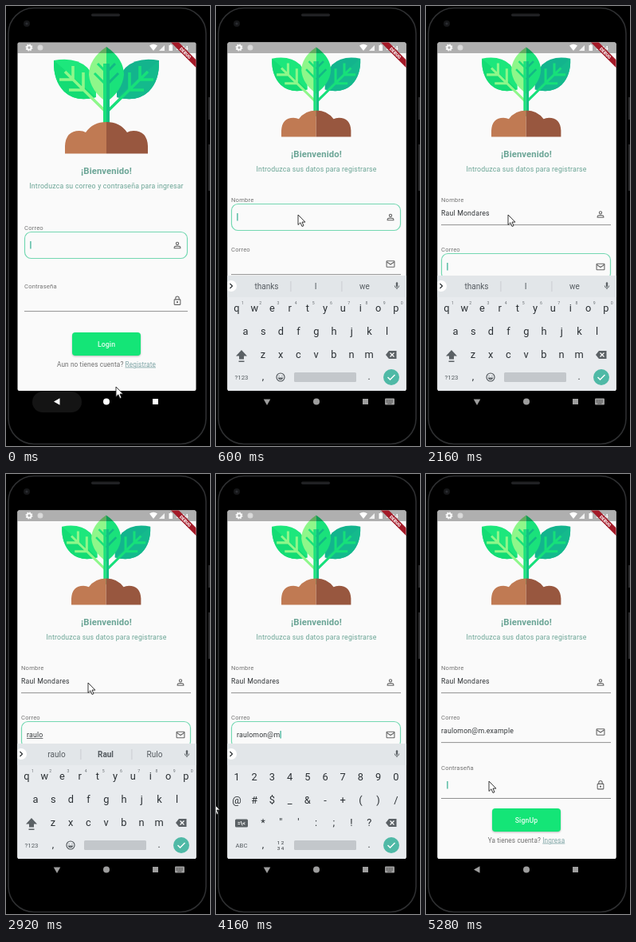
Write an HTML page that moves like this. It is 256 px wide and 550 px high and loops after 5.32 s.

```html
<!DOCTYPE html>
<html lang="es">
<head>
<meta charset="utf-8">
<title>Registro</title>
<style>
  html, body { margin: 0; width: 100%; height: 100%; overflow: hidden; background: #000; }
  svg { display: block; width: 256px; height: 550px; font-family: Roboto, "Open Sans", sans-serif; }
  text { white-space: pre; }
</style>
</head>
<body>
<svg id="stage" viewBox="0 0 256 550" xmlns="http://www.w3.org/2000/svg"></svg>
<script>
const LOOP = 5320, STEP = 40;
const TEAL = '#6ba596', LINK = '#7fa5a6', GREY = '#737373', INK = '#33373a', KEY = '#2b3034', MINT = '#74d8b2';
const stage = document.getElementById('stage');
const $ = id => document.getElementById(id);
const clamp = v => Math.max(0, Math.min(1, v));
const ease = v => 1 - (1 - clamp(v)) ** 2;

// --- markup helpers ---
const text = (x, y, str, size, fill, more = '') =>
  `<text x="${x}" y="${y}" font-size="${size}" fill="${fill}" ${more}>${str}</text>`;
const mid = (x, y, str, size, fill, more = '') =>
  text(x, y, str, size, fill, 'text-anchor="middle" ' + more);
const rect = (x, y, w, h, fill, more = '') =>
  `<rect x="${x}" y="${y}" width="${w}" height="${h}" fill="${fill}" ${more}/>`;
const circle = (x, y, r, fill, more = '') =>
  `<circle cx="${x}" cy="${y}" r="${r}" fill="${fill}" ${more}/>`;
const path = (d, fill, more = '') => `<path d="${d}" fill="${fill}" ${more}/>`;
const line = (d, color, width, more = '') =>
  path(d, 'none', `stroke="${color}" stroke-width="${width}" ${more}`);
const spaced = 'letter-spacing=".18"';

const SHAPES = {
  person: '<circle cx="12" cy="8" r="3"/><path d="M5 19v-2c0-2 4-3 7-3s7 1 7 3v2z"/>',
  mail: '<rect x="3" y="5" width="18" height="14" rx="1"/><path d="M3 7l9 6 9-6"/>',
  lock: '<rect x="5" y="9" width="14" height="12" rx="1"/><path d="M8 9V6a4 4 0 0 1 8 0v3"/><circle cx="12" cy="15" r="1"/>',
  smile: '<circle cx="12" cy="12" r="9"/><path d="M7.5 14a5 5 0 0 0 9 0zM8.5 9v1M15.5 9v1"/>',
  mic: '<path d="M12 4v8" stroke-width="5" stroke-linecap="round"/><path d="M6 11a6 6 0 0 0 12 0M12 17v4"/>'
};
const icon = (name, x, y, scale = .546, color = '#666') =>
  `<g transform="translate(${x} ${y}) scale(${scale}) translate(-12 -12)" fill="none" stroke="${color}" stroke-width="2">${SHAPES[name]}</g>`;

// --- plant ---
function plant() {
  const wing = 'M60 68Q87 63 102 77Q114 90 113 114Q88 121 73 107Q59 93 60 68Z';
  const half = 'M60 68Q59 93 73 107Q88 121 113 114Z';
  const veins = 'M74 82L124 131M84 75V92M97 83V104M67 92H84M79 105H97';
  const leaf = (top, low, vein) => path(wing, top) + path(half, low) + line(veins, vein, 3.6);
  return leaf('#1de77c', '#14dc74', '#8ef78a') +
    `<g transform="translate(252 0) scale(-1 1)">${leaf('#13b48d', '#14ba8c', '#16e07a')}</g>` +
    path('M126 51Q104 66 104 86Q106 106 126 120Z', '#8ef78a') +
    path('M126 51Q148 66 148 86Q146 106 126 120Z', '#1ae27b') +
    line('M126 99L111 84M126 83L115 72', '#1ae27b', 3) +
    line('M126 99L141 84M126 83L137 72', '#12b885', 3) +
    rect(122, 72, 4, 82, '#1ae27b') + rect(126, 72, 4, 82, '#12c282') +
    path('M74 184.5V175Q75 156 92 156Q97 156 100 158Q109 145 126 145V184.5Z', '#c07a53') +
    path('M126 145Q143 145 152 158Q155 156 160 156Q177 156 178 175V184.5H126Z', '#98573f');
}

// --- form field: label above, underline at rest, outline when focused ---
function field(id, x, w, label, y, shape) {
  return text(x, y + 2.7, label, 7.64, GREY, spaced) +
    rect(x, 0, w, .9, '#858585', `id="${id}Line"`) +
    rect(x + .5, y + 5.5, w - 1, 33, 'none', `id="${id}Box" rx="8" stroke="${MINT}" stroke-width="1.2"`) +
    `<g id="${id}Icon">${icon(shape, x + w - 13, 0)}</g>` +
    text(x, 0, '', 8.74, INK, `id="${id}Text" ${spaced}`) +
    rect(0, 0, 0, .7, INK, `id="${id}Mark"`) +
    rect(0, y + 17, 1.4, 9.5, '#4fb8a0', `id="${id}Caret"`);
}

function setField(id, x, y, { focus = false, value = '', word = '', blink = false, outline = focus }) {
  const el = $(id + 'Text'), left = focus ? x + 7 : x;
  const base = y + (focus ? 24.7 : 20);
  el.textContent = value;
  el.setAttribute('x', left);
  el.setAttribute('y', base);
  const width = value ? el.getComputedTextLength() : 0;
  const marked = focus && word ? el.getSubStringLength(value.length - word.length, word.length) : 0;
  const mark = $(id + 'Mark');
  mark.setAttribute('x', left + width - marked);
  mark.setAttribute('y', base + 1.3);
  mark.setAttribute('width', marked);
  $(id + 'Caret').setAttribute('x', left + width + .2);
  $(id + 'Line').setAttribute('y', y + (focus ? 38 : 31.2));
  $(id + 'Icon').setAttribute('transform', `translate(0 ${y + (focus ? 22 : 18.5)})`);
  show(id + 'Caret', focus && blink);
  show(id + 'Box', outline);
  show(id + 'Line', !outline);
}

const button = (y, label) =>
  rect(83, y + 1.5, 86, 28.5, '#000', 'rx="4" opacity=".25" filter="url(#soft)"') +
  rect(83, y, 86, 29, '#14e577', 'rx="4"') +
  mid(126, y + 17.6, label, 8.74, '#e4fdef', 'font-weight="500" letter-spacing=".1"');

const page = (titleY, subtitle, subY, footY, ask, link) => rect(14, 45, 225, 436, '#fafafa') +
  mid(126, titleY, '¡Bienvenido!', 11.3, TEAL, 'font-weight="700" letter-spacing=".1"') +
  mid(126, subY, subtitle, 8.74, TEAL, spaced) +
  mid(126, footY, `${ask} <tspan fill="${LINK}" text-decoration="underline">${link}</tspan>`, 8.19, '#707070', 'letter-spacing=".15"');

const login = page(210, 'Introduzca su correo y contraseña para ingresar', 227.5, 450.5, 'Aun no tienes cuenta?', 'Registrate') +
  plant() + field('user', 23, 205, 'Correo', 277, 'person') +
  field('pass', 23, 205, 'Contraseña', 350, 'lock') + button(408, 'Login');

const signup = page(189, 'Introduzca sus datos para registrarse', 206.5, 460.5, 'Ya tienes cuenta?', 'Ingresa') +
  `<g transform="translate(125.7 164) scale(.84) translate(-126 -185)">${plant()}</g>` +
  field('name', 19, 213, 'Nombre', 242, 'person') +
  field('mail', 19, 213, 'Correo', 304, 'mail') +
  field('code', 19, 213, 'Contraseña', 367, 'lock') + button(418, 'SignUp');

// --- keyboard ---
const row = (keys, x, y) =>
  [...keys].map((k, i) => mid(x + 22.2 * i, y, k === '&' ? '&amp;' : k, 12.8, KEY)).join('');

const keyboard = rect(14, 337, 225, 144, '#e8ebee') + rect(14, 337, 225, 27, '#e2e6e9') +
  circle(19, 350, 7, '#fff') + line('M17.5 347l3 3-3 3', KEY, 1.2) +
  icon('mic', 227, 350, .46, '#5b6165') +
  `<g id="hints">${rect(93.5, 344, .8, 13, '#c3c8cc')}${rect(157.5, 344, .8, 13, '#c3c8cc')}` +
  [63.5, 125, 186.5].map((x, i) => mid(x, 354, '', 10, '#555b60', `id="hint${i}"`)).join('') + '</g>' +
  `<g id="letters">${row('qwertyuiop', 26, 382.3)}${row('asdfghjkl', 37, 411.3)}${row('zxcvbnm', 59, 440.3)}` +
  [...'1234567890'].map((n, i) => mid(33.5 + 22.2 * i, 373, n, 5.2, '#6c7276')).join('') +
  path('M32 430l-7 7.5h4v4h6v-4h4zM28.5 443.5h7v1.5h-7z', '#5b6165') +
  mid(32, 467, '?123', 7.8, '#555b60') + icon('smile', 81, 464, .56, '#4d5357') + '</g>' +
  `<g id="symbols">${row('1234567890', 26, 382.6)}${row('@#$_&-+()/', 26, 412)}${row('*"\':;!?', 59, 440.3)}` +
  rect(24, 431.5, 16, 10, '#5b6165', 'rx="1.5"') + mid(32, 439, '=\\&lt;', 6.5, '#fff', 'font-weight="700"') +
  mid(32, 467, 'ABC', 7.8, '#555b60') + mid(81, 463.3, '1 2', 6.2, KEY) + mid(81, 470, '3 4', 6.2, KEY) + '</g>' +
  path('M213 436l4-5h9.5v10h-9.5z', '#5b6165') + line('M218.5 433.5l5 5m0-5l-5 5', '#fff', 1.2) +
  mid(59, 467, ',', 12, KEY) + rect(98, 458, 78, 12, '#c3c7cb', 'rx="1.5"') + mid(192, 467, '.', 12, KEY) +
  circle(220, 464, 10, '#4fb9a6') + line('M215.5 464l3 3 6-6', '#fff', 1.4);

// --- device, bars, pointer ---
const device = rect(254, 114, 2, 28, '#2a2a2c') + rect(254, 173, 2, 58, '#2a2a2c') +
  rect(3, 2.5, 248, 545, '#000', 'rx="32" stroke="#2e2f31" stroke-width="1.6"') +
  rect(107, 9.5, 36, 3.5, '#202123', 'rx="1.7"') +
  circle(26, 22, 4, '#161719') + circle(26, 22, 1.6, '#2c2e33');

const statusBar = rect(14, 45, 225, 14, '#000', 'opacity=".3"') +
  circle(29, 52, 2.6, 'none', 'stroke="#fff" stroke-width="1.8"') +
  circle(29, 52, 3.9, 'none', 'stroke="#fff" stroke-width="1.2" stroke-dasharray="1.5 1.56"') +
  circle(43, 52, 3.5, '#fff', 'opacity=".5"') + circle(43, 52, 2, '#ddd', 'opacity=".7"') +
  path('M180 49.5Q185 46 190 49.5L185 56Z', '#fff') + path('M192 56L199 49V56Z', '#fff', 'opacity=".85"') +
  rect(204.5, 49, 4.5, 7, '#fff', 'rx=".6"') + rect(206, 48, 1.6, 1.2, '#fff') +
  text(213, 55.2, '5:44', 8, '#fff', 'font-weight="500"');

const ribbon = `<g transform="translate(239 45) rotate(45)">${rect(-26, 16, 52, 7, '#a31a28')}` +
  mid(0, 21.5, 'DEBUG', 5.5, '#fff', 'font-weight="900"') + '</g>';

const navBar = rect(14, 481, 225, 29, '#000') +
  rect(33, 482, 62, 26, '#141414', 'rx="13" id="ripple"') +
  `<g id="nav">${path('M60 494.5l7.5-4.2v8.4z', '#fff', 'id="back"')}` +
  `<g id="navKeys">${path('M64 499l-4.3-7.5h8.6z', '#fff')}${rect(212, 490.5, 12, 8, '#fff', 'rx="1"')}` +
  line('M213.5 493h9M213.5 495h9M215.5 497h5', '#000', .8, 'stroke-dasharray="1 .8"') + '</g>' +
  circle(126, 494.5, 4, '#fff') + rect(184, 491, 7, 7, '#fff') + '</g>';

stage.innerHTML = `<defs>
  <clipPath id="screen">${rect(14.5, 45.5, 224, 435.5, '#000', 'rx="2"')}</clipPath>
  <filter id="soft" x="-10%" y="-20%" width="120%" height="150%"><feGaussianBlur stdDeviation="1.3"/></filter>
</defs>` + device +
  `<g clip-path="url(#screen)"><g id="login">${login}</g><g id="signup">${signup}</g>
   <g id="keyboard">${keyboard}</g>${statusBar}${ribbon}</g>` + navBar +
  `<g id="pointer">${path('M0 0V12.5L2.9 9.8L5 14.5L7 13.6L5 9.1H8.9Z', '#fff', 'stroke="#222" stroke-width=".9"')}</g>`;

function show(id, on) { $(id).style.display = on ? '' : 'none'; }

// --- timeline ---
const NAME = 'Raul Mondares', MAIL = 'raulomon@m.example';
const nameAt = i => i < 8 ? 720 + 120 * i : 1680 + 80 * (i - 8);
const mailAt = i => i < 5 ? 2320 + 100 * i : i < 8 ? 3080 + 120 * (i - 5) : i < 9 ? 4080 : 4160 + 72 * (i - 9);
const typed = (str, at, t) => [...str].filter((_, i) => at(i) <= t).join('');

// A star marks the suggestion set in bold.
const HINTS = {
  '': ['thanks', 'I', 'we'],
  Mon: ['Mond', '*Money', 'Mono'],
  raulo: ['raulo', '*Raul', 'Rulo'],
  raulomon: ['raulomon', 'raulomo', 'Raul mono']
};

// time, x, y of the pointer tip
const TRACK = [
  [0, 138, 476], [120, 165, 447], [200, 166, 446], [400, 103, 261], [3400, 103, 261],
  [3640, 33, 459], [3760, 33, 459], [3880, 3, 436], [3960, 8, 430], [4040, 25, 408],
  [4080, 25, 408], [4200, -14, 412], [4880, -14, 412], [4881, 262, 425], [5000, 220, 460],
  [5080, 220, 460], [5240, 79, 384], [LOOP, 79, 384]
];

function along(track, t) {
  const i = Math.max(1, track.findIndex(p => p[0] > t));
  const [t0, x0, y0] = track[i - 1], [t1, x1, y1] = track[i];
  const k = clamp((t - t0) / (t1 - t0)), s = k * k * (3 - 2 * k);
  return [x0 + (x1 - x0) * s, y0 + (y1 - y0) * s];
}

function draw(t) {
  const blink = Math.floor(t / 255) % 2 === 0;
  const enter = ease((t - 200) / 160);
  show('signup', enter > 0);
  $('signup').setAttribute('opacity', enter);
  $('signup').setAttribute('transform', `translate(0 ${110 * (1 - enter)})`);

  const keys = ease((t - 440) / 140) * (1 - ease((t - 5060) / 140));
  show('keyboard', keys > 0);
  $('keyboard').setAttribute('transform', `translate(0 ${144 * (1 - keys)})`);
  const open = t >= 440 && t < 5080;
  show('navKeys', open);
  show('back', !open);
  $('nav').setAttribute('opacity', 1 - .38 * enter);
  $('ripple').setAttribute('opacity', clamp(1 - t / 240));

  const onName = t >= 440 && t < 2120, onMail = t >= 2120 && t < 5080;
  const name = typed(NAME, nameAt, t), mail = typed(MAIL, mailAt, t);
  const nameWord = name.split(' ').pop(), mailWord = mail.includes('@') ? '' : mail;
  setField('user', 23, 277, { focus: true, blink });
  setField('pass', 23, 350, {});
  setField('name', 19, 242, { focus: onName, value: name, word: nameWord, blink });
  setField('mail', 19, 304, { focus: onMail, value: mail, word: mailWord, blink });
  setField('code', 19, 367, { focus: t >= 5240, blink, outline: false });

  const symbols = t >= 3800;
  show('symbols', symbols);
  show('letters', !symbols);
  show('hints', !symbols);
  const word = onMail ? mailWord : nameWord;
  (HINTS[word] || [word, word + 'o', word + 's']).forEach((hint, i) => {
    const el = $('hint' + i);
    el.textContent = hint.replace('*', '');
    el.setAttribute('font-weight', hint[0] === '*' ? 700 : 400);
  });

  const [x, y] = along(TRACK, t);
  $('pointer').setAttribute('transform', `translate(${x} ${y})`);
}

const start = performance.now();
function tick() {
  const t = (performance.now() - start) % LOOP;
  draw(Math.floor(t / STEP) * STEP);
  requestAnimationFrame(tick);
}
tick();
</script>
</body>
</html>
```
